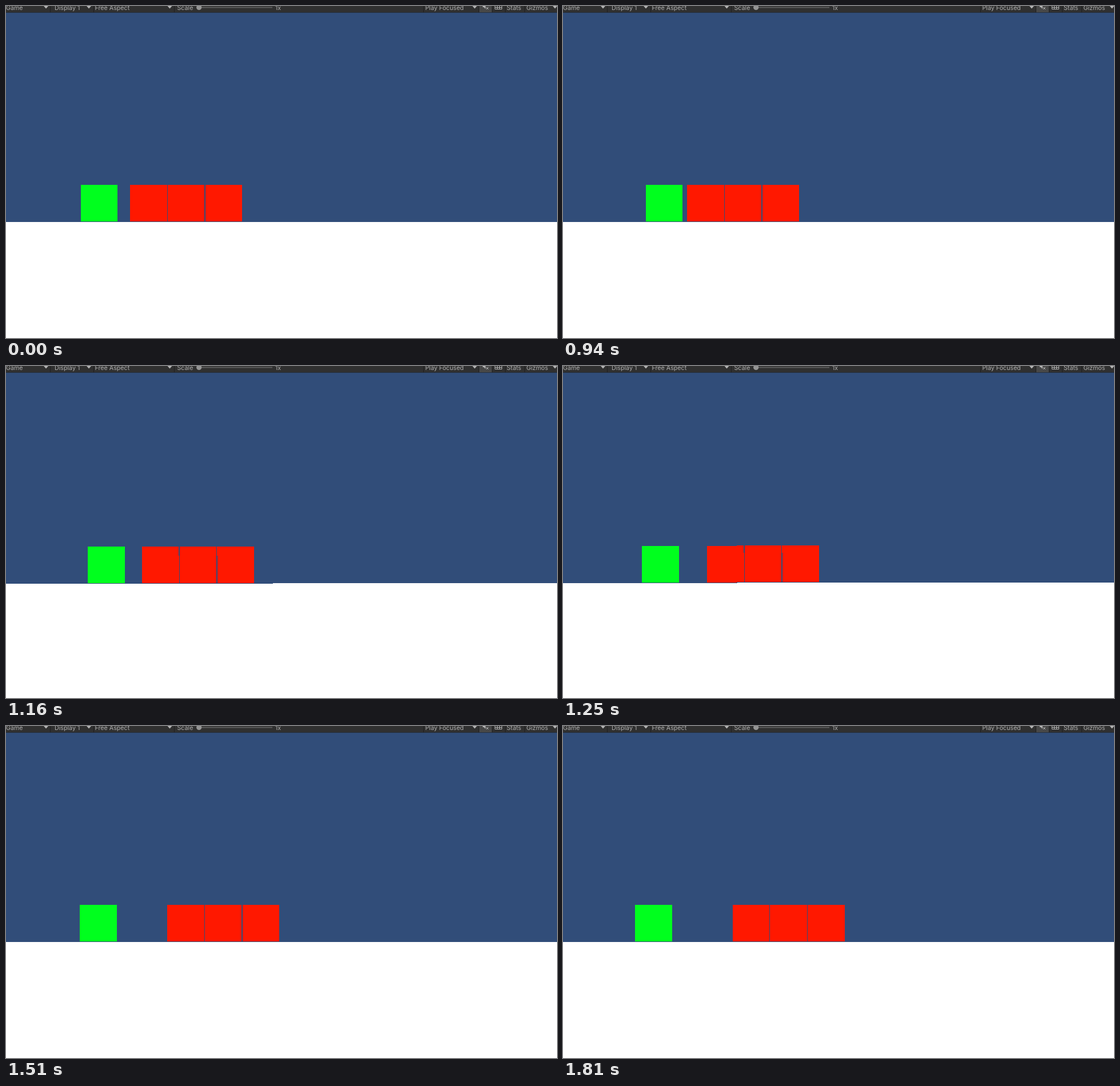
An HTML page that plays this animation: 964x581 px, repeating every 1.84 s.

```html
<!DOCTYPE html>
<html lang="en">
<head>
<meta charset="utf-8">
<title>Collision with camera shake</title>
<style>
  html, body { margin: 0; width: 100%; height: 100%; overflow: hidden; background: #314d79; }
  svg { display: block; }
  text { font: 10.7px Inter, "Liberation Sans", sans-serif; fill: #aeaeae; }
</style>
</head>
<body>
<svg width="964" height="581" viewBox="0 0 964 581">
  <rect width="964" height="581" fill="#314d79"/>
  <g id="world" shape-rendering="crispEdges">
    <rect x="-60" y="378" width="1084" height="260" fill="#fff"/>
    <rect id="hero" y="313" width="64.8" height="64" fill="#00ff1e"/>
    <g id="wall" fill="#ff1800">
      <rect y="313" width="64.6" height="64"/>
      <rect x="65.8" y="313" width="64.6" height="64"/>
      <rect x="131.6" y="313" width="64.6" height="64"/>
    </g>
  </g>
  <g id="bar">
    <rect width="964" height="11" fill="#303030"/>
    <rect y="11" width="964" height="1" fill="#242f40"/>
    <rect x="828" width="22" height="11" fill="#484848"/>
    <path id="lines" stroke="#1f1f1f"/>
    <path id="arrows" fill="#b4b4b4"/>
    <path d="M342 2.5H466" stroke="#5c5c5c" stroke-width="2"/>
    <circle cx="337.7" cy="2.5" r="4.6" fill="#949494"/>
    <path d="M834 0h2l3 -2v7l-3 -3h-2z" fill="#b4b4b4"/>
    <path d="M840 2l4 4M844 2l-4 4" stroke="#b4b4b4"/>
    <path d="M855.5 -1V5.5H867.5V-1M855.5 2.5H867.5M859.5 -1V5.5M863.5 -1V5.5" fill="none" stroke="#b4b4b4"/>
  </g>
</svg>
<script>
const LOOP = 1840, START = 820, HIT = 1010, SETTLE = 1510, STEP = 30;
const $ = id => document.getElementById(id);

// Camera offset x, y and tilt in degrees for each step after the hit
const SHAKE = [
  [-4, -3.6, 0.05], [7.2, 2.5, -0.1], [3, -2, 0.04], [-5, 3.6, -0.06],
  [2, -1, 0.03], [-3.9, 2.5, -0.06], [3, -2, 0.05], [1, 2, -0.04],
  [-2.6, 1.3, -0.07], [2, -1.5, 0.03], [-1, 1, 0], [1, 2.6, -0.03]
];

// Time and x of the green block
const HERO = [[790, 130.5], [820, 133], [HIT, 151.5], [1040, 151.3],
  [1160, 146.9], [1250, 141.1], [1380, 133.9], [SETTLE, 129], [1660, 126.9], [1810, 126]];

function heroX(t) {
  if (t < START) return HERO[0][1];
  const i = HERO.findIndex(k => k[0] >= t);
  if (i < 0) return HERO[HERO.length - 1][1];
  const [t0, x0] = HERO[i - 1], [t1, x1] = HERO[i];
  return x0 + (x1 - x0) * (t - t0) / (t1 - t0);
}

// Constant friction after the push
function wallX(t) {
  const s = Math.max(0, t - HIT) / 1000;
  return 217 + 181 * s - 102 * s * s;
}

function snap(t) {
  if (t < START) return 0;
  const [base, last] = t < HIT ? [START, 5] : t < SETTLE ? [HIT, 15] : [SETTLE, 10];
  return base + STEP * Math.min(last, Math.floor((t - base) / STEP));
}

function draw(ms) {
  const t = snap(ms % LOOP);
  const [dx, dy, tilt] = SHAKE[Math.round((t - HIT) / STEP)] || [0, 0, 0];
  $("hero").setAttribute("x", heroX(t));
  $("wall").setAttribute("transform", `translate(${wallX(t)} 0)`);
  $("world").setAttribute("transform", `translate(${dx} ${dy}) rotate(${tilt} 482 378)`);
}

function label(x, str) {
  const el = document.createElementNS("http://www.w3.org/2000/svg", "text");
  el.setAttribute("x", x);
  el.setAttribute("y", 6.5);
  el.textContent = str;
  $("bar").append(el);
}

[[0, "Game"], [85, "Display 1"], [155.5, "Free Aspect"], [299.5, "Scale"], [471, "1x"],
  [733.5, "Play Focused"], [876, "Stats"], [910.5, "Gizmos"]].forEach(a => label(...a));
$("lines").setAttribute("d",
  [77, 153, 294, 730, 827, 850, 873, 907].map(x => `M${x}.5 0V11`).join(""));
$("arrows").setAttribute("d",
  [70, 145, 286.5, 820, 960.5].map(x => `M${x - 4} 0h8l-4 4.5z`).join(""));

let origin;
function tick(now) {
  origin ??= now;
  draw(now - origin);
  requestAnimationFrame(tick);
}
draw(0);
requestAnimationFrame(tick);
</script>
</body>
</html>
```
